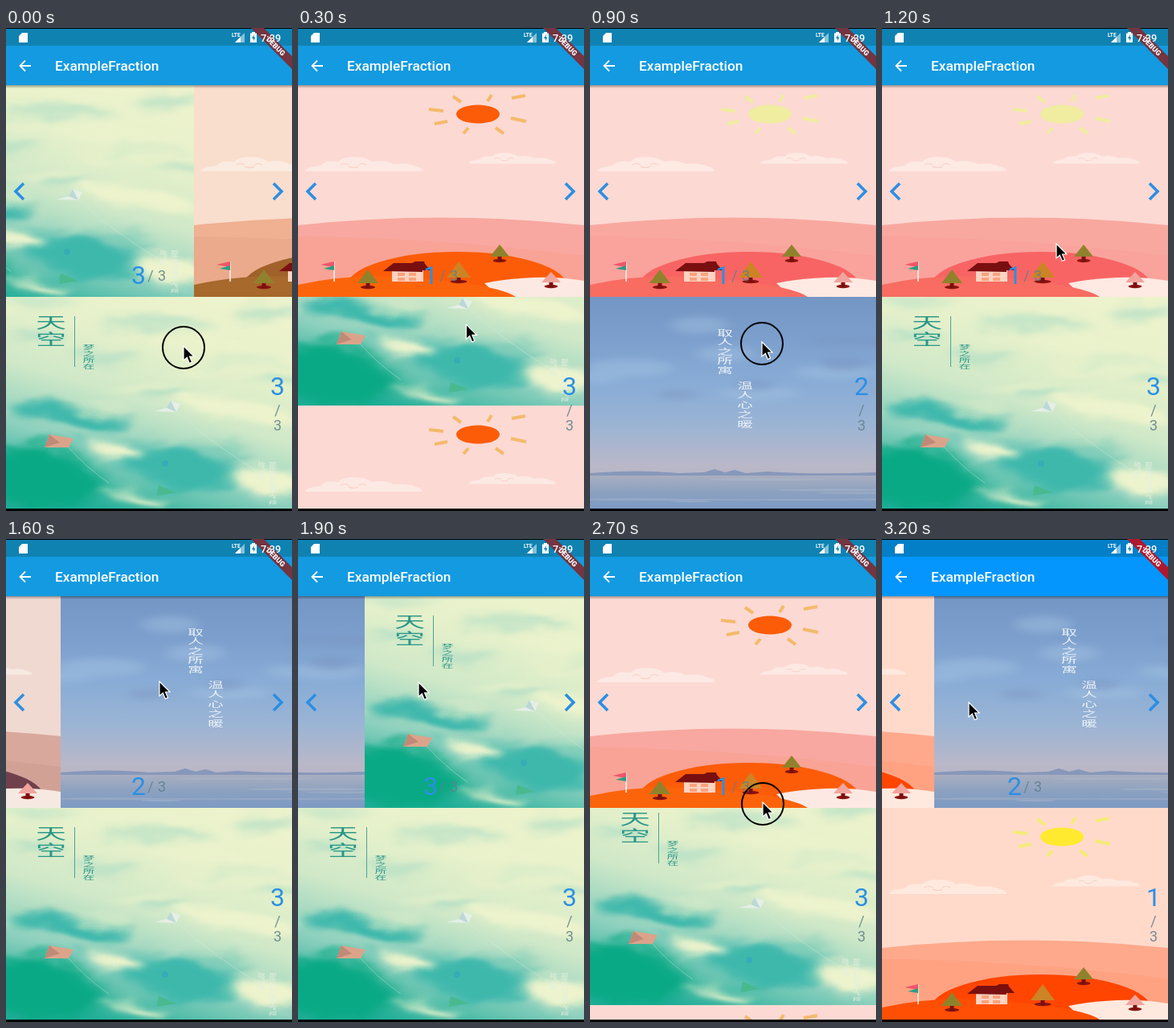
Animation of 356 by 600 pixels, one loop 3.3 s. Source, as an HTML page:

```html
<!DOCTYPE html>
<html lang="en">
<head>
<meta charset="utf-8">
<title>ExampleFraction</title>
<style>
  html, body { margin: 0; width: 100%; height: 100%; overflow: hidden; background: #000; }
  svg { display: block; }
  #stage {
    width: 356px; height: 600px; font-family: Roboto, sans-serif;
    --status: color-mix(in srgb, var(--bar) 77%, #003018);
    --air: color-mix(in srgb, var(--back) 42%, #fffdf8);
    --cloud: color-mix(in srgb, var(--back) 24%, #fffdf8);
    --mid: color-mix(in srgb, var(--main) 7%, var(--back));
    --front: color-mix(in srgb, var(--main) 93%, #ffd040);
    --ray: color-mix(in srgb, var(--sun) 35%, #f0eca0);
  }
  .cjk { font-family: "Noto Serif", "Noto Sans CJK SC", "Noto Sans CJK", serif; text-anchor: middle; }
  .count { fill: #2a8fe4; font-size: 32px; text-anchor: middle; }
  .total { fill: #607f88; fill-opacity: .85; font-size: 18px; text-anchor: middle; }
</style>
</head>
<body>
<svg id="stage" viewBox="0 0 356 600"></svg>
<script>
const LOOP = 3300, STEP = 100, W = 356, H = 263;
const stage = document.getElementById('stage');
const repeat = (n, draw) => Array.from({ length: n }, (_, i) => draw(i)).join('');

let seed = 11;
const random = (low, high) => {
  seed = (seed * 16807) % 2147483647;
  return low + (high - low) * seed / 2147483647;
};

// ---- scene parts ----
const column = (text, x, y, step, size, stretch, fill) => repeat(text.length, i =>
  `<text class="cjk" transform="translate(${x} ${y + i * step}) scale(${stretch} 1)" font-size="${size}" fill="${fill}">${text[i]}</text>`);

const streaks = (n, y0, y1, ry, fill) => repeat(n, () =>
  `<ellipse cx="${random(0, W)}" cy="${random(y0, y1)}" rx="${random(25, 75)}" ry="${random(ry / 2, ry)}" fill="${fill}"/>`);

const tree = (x, y, w, h, fill) => `
  <ellipse cx="${x}" cy="${y + h + 5}" rx="${w * .7}" ry="2.2" fill="#8a1410"/>
  <rect x="${x - 2.5}" y="${y + h - 1}" width="5" height="7" fill="#7a1010"/>
  <path d="M${x} ${y}L${x + w} ${y + h}H${x - w}Z" fill="${fill}"/>`;

const cloud = (x, y, s) => `<g transform="translate(${x} ${y}) scale(${s})">
  <path d="M0 18Q0 13 19 11Q24 4 41 6Q46 0 60 0Q76 0 83 6Q100 3 110 9Q130 7 137 12Q146 13 146 18Z" fill="var(--cloud)"/>
  <path d="M44 10q5 -3 10 0M66 10q5 -3 10 0M54 12q6 3 12 0" fill="none" stroke="#f6cfc2" stroke-width="1.2"/></g>`;

const hills = `
  <rect width="356" height="263" fill="var(--air)"/>
  <path d="M163 30L181 32M193 14L203 21M236 20L241 12M266 16L283 13M265 41L284 45M246 53L256 60M206 60L212 53M170 48L186 45"
    stroke="var(--ray)" stroke-width="4"/>
  <ellipse cx="224" cy="36" rx="27" ry="11.5" fill="var(--sun)"/>
  ${cloud(9, 89, 1)}${cloud(212, 84, .745)}
  <path d="M0 174Q178 155 356 174V263H0Z" fill="var(--back)"/>
  <path d="M0 188Q170 189 356 212V263H0Z" fill="var(--mid)"/>
  <ellipse cx="198" cy="251" rx="138" ry="44" fill="var(--main)"/>
  <path d="M232 246Q300 233 356 243V263H250Z" fill="var(--cloud)"/>
  <path d="M0 248Q80 230 170 242Q250 249 271 263H0Z" fill="var(--front)"/>
  <rect x="117" y="230" width="39" height="14" fill="#fdd3c2"/>
  <path d="M124 233h9v4h-9zM138 233h9v4h-9zM124 239h9v4h-9zM138 239h9v4h-9z" fill="#fba37d"/>
  <path d="M106 231L119 221H142L146 219H157L158 222L165 230H155V232Z" fill="#7a0f10"/>
  ${tree(87, 229, 13, 17, '#90822c')}${tree(200, 219, 15, 20, '#cc8424')}
  ${tree(251, 198, 12, 15, '#90822c')}${tree(315, 232, 12, 13, '#f0a49c')}
  <path d="M45 219V244" stroke="#fbeee6" stroke-width="1.6"/>
  <path d="M45 219V226L28 223Z" fill="#f0556a"/><path d="M45 224V230L32 228Z" fill="#2f9b84"/>`;

const sunset = `
  <rect width="356" height="263" fill="url(#dusk)"/>
  <g filter="url(#soft)" opacity=".4">${streaks(6, 20, 200, 12, '#a9c6e4')}${streaks(4, 10, 150, 10, '#7890bc')}</g>
  <path d="M0 219Q60 214 110 219L142 218L155 214L168 218L180 215L194 219L220 217Q280 221 356 218V223H0Z" fill="#8798ba"/>
  <rect y="222" width="356" height="41" fill="url(#sea)"/>
  <g opacity=".4">${streaks(8, 226, 258, 1.4, '#b2bccc')}</g>
  ${column('取人之所寓', 168, 49, 11.4, 9.8, 2, '#eef3f8')}
  ${column('温人心之暖', 193, 114, 12, 9.8, 2, '#eef3f8')}`;

const patch = (x, y, rx, ry, fill) => `<ellipse cx="${x}" cy="${y}" rx="${rx}" ry="${ry}" transform="rotate(8 ${x} ${y})" fill="${fill}"/>`;
const cream = '#edf3cc', mint = '#9ed8c4', teal = '#3fb8ac', deep = '#0aa985';
const sky = `
  <rect width="356" height="263" fill="url(#haze)"/>
  <g filter="url(#wisp)">
    <g opacity=".5">${streaks(8, 0, 130, 9, mint)}${streaks(9, 10, 170, 10, cream)}${streaks(6, 165, 263, 8, teal)}</g>
    ${patch(75, 147, 75, 12, teal)}${patch(45, 226, 80, 38, deep)}${patch(215, 215, 75, 24, teal)}
    ${patch(135, 188, 38, 10, cream)}${patch(290, 140, 80, 15, cream)}${patch(328, 228, 48, 20, cream)}${patch(160, 251, 35, 5, cream)}
  </g>
  <path d="M78 187Q100 212 128 231M214 144Q260 185 312 216" fill="none" stroke="#d8eee0" stroke-width=".8" opacity=".5"/>
  <path d="M54 171L84 176L78 187L48 187Z" fill="#dba48a"/><path d="M54 171L67 181L48 187Z" fill="#c08a78"/>
  <path d="M205 129L217 133L212 143L185 142L200 138Z" fill="#e4efe6"/><path d="M205 129L212 143L200 138Z" fill="#bdd8d6"/>
  <path d="M190 234L212 243L188 247Z" fill="#49b98e"/><circle cx="198" cy="207" r="4" fill="#2e9fc0" opacity=".5"/>
  ${column('天空', 56, 39, 20.5, 19, 2, '#2a9787')}
  <path d="M85.5 24V87" stroke="#4ba497" stroke-width="1"/>
  ${column('梦之所在', 103, 65, 8, 7.3, 2, '#2a9787')}
  ${column('那年我们在草地上飞翔', 332, 209, 5.3, 5, 2, '#e2efe0')}
  ${column('放飞梦想', 318, 209, 5.3, 5, 2, '#e2efe0')}`;

const scenes = { hills, sunset, sky };
const order = Object.keys(scenes);
const gradient = (id, colors, x1 = 0, x2 = 0) => `<linearGradient id="${id}" x1="${x1}" x2="${x2}" y2="1">` +
  colors.map((c, i) => `<stop offset="${i / (colors.length - 1)}" stop-color="${c}"/>`).join('') + '</linearGradient>';
const pager = (id, y) => `<svg y="${y}" width="${W}" height="${H}"><use id="${id}A"/><use id="${id}B"/></svg>`;

stage.innerHTML = `
<defs>
  ${gradient('dusk', ['#7496c4', '#7c9fcd', '#88acd6', '#9ab4d4', '#bab8c8', '#a8a9bc'])}
  ${gradient('sea', ['#a9aec0', '#8ba1c0', '#7d9ac4'])}
  ${gradient('haze', ['#edf3cc', '#e6f1cb', '#cfe8c8', '#8dd0be', '#1fae98'], .7, .3)}
  ${gradient('shadow', ['rgba(0,0,0,.35)', 'rgba(0,0,0,0)'])}
  <filter id="soft" x="-20%" y="-20%" width="140%" height="140%"><feGaussianBlur stdDeviation="8 4"/></filter>
  <filter id="wisp" filterUnits="userSpaceOnUse" x="-30" y="-30" width="416" height="323" color-interpolation-filters="sRGB">
    <feTurbulence type="fractalNoise" baseFrequency=".012 .025" numOctaves="3" seed="4" result="noise"/>
    <feGaussianBlur in="SourceGraphic" stdDeviation="9 5"/>
    <feDisplacementMap in2="noise" scale="32" xChannelSelector="R" yChannelSelector="G"/>
  </filter>
  ${order.map(n => `<symbol id="${n}" viewBox="0 0 ${W} ${H}">${scenes[n]}</symbol>`).join('')}
</defs>
<rect width="356" height="600"/>
${pager('top', 71)}${pager('low', 334)}
<path d="M22 193L12 203L22 213M333 193L343 203L333 213" fill="none" stroke="#2a8fe4" stroke-width="3.6"/>
<text id="topCount" class="count" x="165" y="318"></text>
<text class="total" x="180" y="314">/</text><text class="total" x="194" y="314">3</text>
<text id="lowCount" class="count" x="338" y="456"></text>
<text class="total" x="338" y="481">/</text><text class="total" x="338" y="500">3</text>
<rect y="71" width="356" height="4" fill="url(#shadow)"/>
<rect y="22" width="356" height="49" fill="var(--bar)"/>
<rect y="1" width="356" height="21" fill="var(--status)"/>
<path d="M31 47H18M24 40.5L17.5 47L24 53.5" fill="none" stroke="#fff" stroke-width="1.8"/>
<text x="61" y="53" font-size="17.3" font-weight="500" fill="#fff">ExampleFraction</text>
<path d="M305 0H321L356 35V51Z" fill="var(--ribbon)"/>
<g fill="#fff">
  <path d="M20 6H27V18H16V10Z"/>
  <text x="281" y="11" font-size="6.5" font-weight="700">LTE</text>
  <path d="M297 6V18H285Z" opacity=".5"/><path d="M292 11V18H285Z"/>
  <path d="M306 5H310V6.5H312V18H304V6.5H306Z"/>
  <path d="M309 8L306 13H308V16L310.5 11.5H308.500Z" fill="var(--status)"/>
  <text x="317" y="17" font-size="12.8" font-weight="500">7:39</text>
  <text transform="translate(335 23.500) rotate(45)" y="2" font-size="9" font-weight="900" text-anchor="middle">DEBUG</text>
</g>
<g id="cursor">
  <circle id="ring" cy="2" r="26" fill="none" stroke="#000" stroke-width="2"/>
  <path d="M0 0V18L4.300 14.200L7.300 21.500L10.500 20.100L7.500 13H13Z" stroke="#fff" stroke-width="1.2"/>
</g>`;

// ---- motion ----
// Each swipe is [start, duration] and moves its pager one page on; both begin on the sky page.
const FIRST = 2, PRESS = 120;
const topSwipes = [-118, 1384, 1694, 2004, 2982].map(start => [start, 300]);
const lowSwipes = [[0, 610], [610, 290], [900, 290], [2652, 300]];
const pointer = [[0, 221, 395], [500, 203, 354], [900, 214, 390], [1200, 217, 268], [1384, 270, 182], [1600, 191, 177],
  [1694, 250, 178], [1900, 150, 178], [2004, 240, 180], [2200, 119, 179], [2600, 215, 346], [2700, 215, 327], [2982, 245, 205], [3200, 108, 203]];

const ease = x => { x = Math.min(1, Math.max(0, x)); return x * x * (3 - 2 * x); };
const position = (swipes, t) => swipes.reduce((sum, [start, span]) => sum + ease((t - start) / span), FIRST);

function pointerAt(t) {
  const next = pointer.findIndex(p => p[0] > t);
  if (next < 0) return pointer[pointer.length - 1].slice(1);
  const [t0, x0, y0] = pointer[next - 1], [t1, x1, y1] = pointer[next];
  const k = ease((t - t0) / (t1 - t0));
  return [x0 + (x1 - x0) * k, y0 + (y1 - y0) * k];
}

// The hills are tinted by what the two pagers are showing.
const tints = {
  vivid:  { main: '#ff4500', back: '#ffa98c', sun: '#ffea30' },
  coral:  { main: '#f86464', back: '#f9a8a0', sun: '#f0eca0' },
  orange: { main: '#fc5c08', back: '#f8a8a0', sun: '#fc5c08' },
  brown:  { main: '#a0612a', back: '#f0b092', sun: '#e8b85c' },
  plum:   { main: '#70404c', back: '#d8a89c', sun: '#e8d890' }
};

function tintFor(top, low) {
  if (Math.round(low) % 3 === 0) return 'vivid';
  if (top % 3 > 2) return 'brown';
  if (top % 3 > 0) return 'plum';
  return low % 1 ? 'orange' : 'coral';
}

const el = id => document.getElementById(id);

function showPages(id, place, vertical) {
  const page = Math.floor(place), part = place - page;
  ['A', 'B'].forEach((slot, i) => {
    const shift = Math.round((i - part) * (vertical ? H : W));
    const attrs = { href: '#' + order[(page + i) % 3], width: W, height: H, x: vertical ? 0 : shift, y: vertical ? shift : 0 };
    for (const name in attrs) el(id + slot).setAttribute(name, attrs[name]);
  });
  el(id + 'Count').textContent = Math.round(place) % 3 + 1;
}

function render(t) {
  const top = position(topSwipes, t), low = position(lowSwipes, t);
  const tint = tintFor(top, low), vivid = tint === 'vivid';
  const colors = { ...tints[tint], bar: vivid ? '#0496fc' : '#139ae0', ribbon: vivid ? '#b0182e' : '#743440' };
  for (const name in colors) stage.style.setProperty('--' + name, colors[name]);
  showPages('top', top, false);
  showPages('low', low, true);
  el('cursor').setAttribute('transform', `translate(${pointerAt(t)})`);
  const pressed = [...topSwipes, ...lowSwipes].some(([start]) => t >= start && t < start + PRESS);
  el('ring').setAttribute('visibility', pressed ? 'visible' : 'hidden');
}

const start = performance.now();
let shown = -1;
function tick() {
  const t = Math.floor(((performance.now() - start) % LOOP) / STEP) * STEP;
  if (t !== shown) render(shown = t);
  requestAnimationFrame(tick);
}
tick();
</script>
</body>
</html>
```
